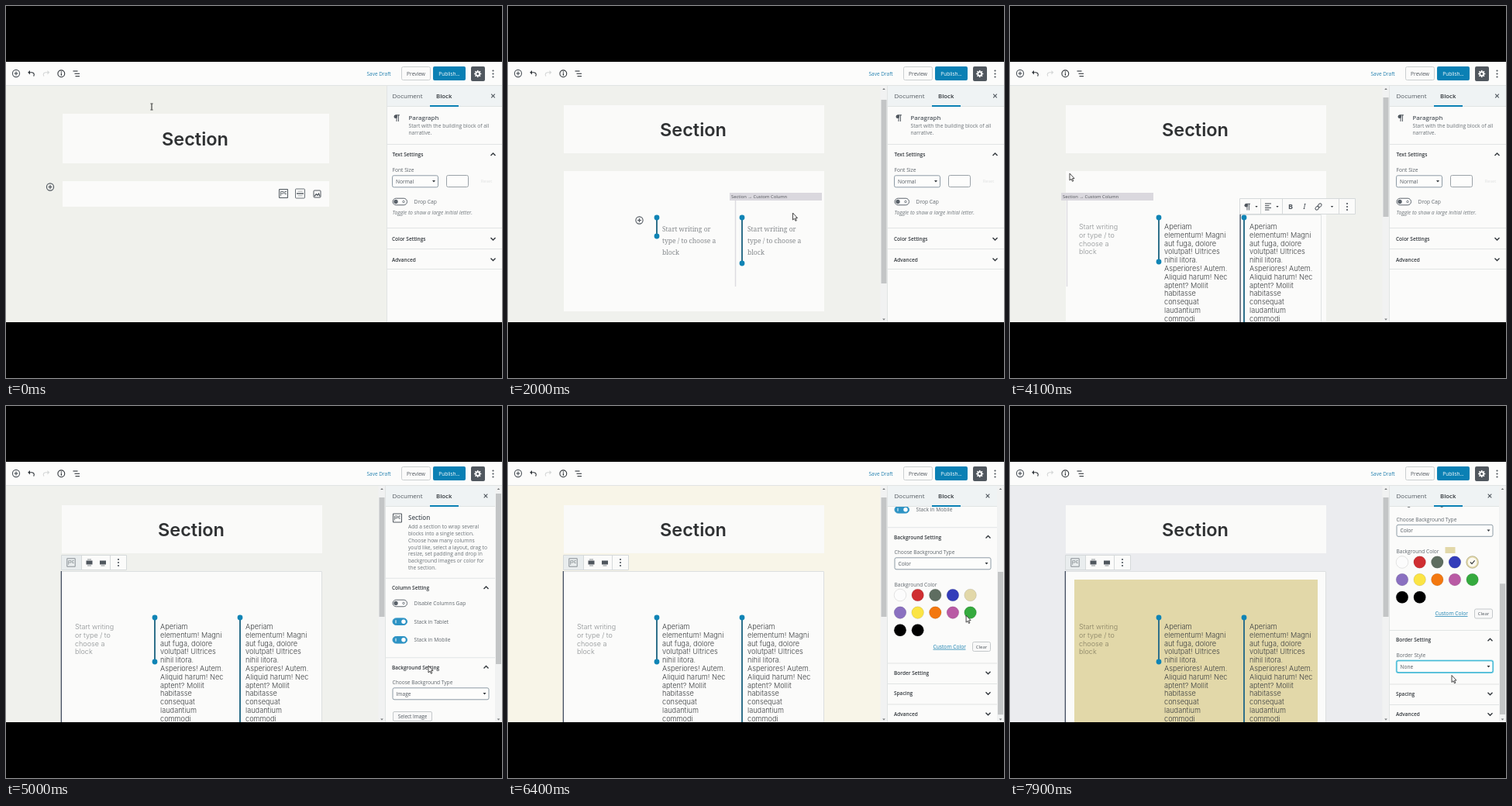
An HTML page with a canvas for the animation above (8 s loop, 640 px wide and 480 px high).

```html
<!DOCTYPE html>
<html lang="en">
<head>
<meta charset="utf-8">
<title>Section block</title>
<style>
html, body { margin: 0; width: 100%; height: 100%; overflow: hidden; background: #000; }
canvas { display: block; }
</style>
</head>
<body>
<canvas id="stage" width="640" height="480"></canvas>
<script>
const c = document.getElementById('stage').getContext('2d');
const LOOP = 8000;
const UI = '"Open Sans", sans-serif';
const BODY = 'Inter, sans-serif';
const SERIF = '"Noto Serif", serif';
const BLUE = '#0a80b4', DARK = '#50575e', INK = '#32373c', LINE = '#e1e4e4', PAPER = '#fbfbfa';
const SAND = '#e2d8a9';

// Moments at which the interface changes state
const AT = {
  picker: 700, columns: 1600, paste2: 2700, paste3: 3500, section: 4300,
  bgOpen: 4900, listOpen: 5500, color: 6000, sand: 6600, border: 7400
};

const COPY = ['Aperiam', 'elementum! Magni', 'aut fuga, dolore', 'volutpat! Ultrices', 'nihil litora.',
  'Asperiores! Autem.', 'Aliquid harum! Nec', 'aptent? Mollit', 'habitasse', 'consequat', 'laudantium', 'commodi'];

const CURSOR = [
  [0, 188, 130, 'beam'], [450, 358, 243, 'arrow'], [750, 358, 243, 'arrow'], [1200, 244, 287, 'beam'],
  [1500, 308, 311, 'hand'], [1650, 308, 311, 'arrow'], [2000, 367.5, 270, 'arrow'], [2400, 238, 302, 'beam'],
  [2750, 238, 302, 'beam'], [3200, 345, 302, 'beam'], [3800, 345, 302, 'beam'], [4100, 77, 219, 'arrow'],
  [4300, 77, 219, 'arrow'], [4800, 545, 338, 'hand'], [5000, 545, 338, 'arrow'], [5400, 568, 340, 'arrow'],
  [5800, 568, 340, 'arrow'], [5950, 560, 348, 'arrow'], [6100, 560, 348, 'arrow'], [6550, 602, 247, 'hand'],
  [6850, 602, 247, 'hand'], [7250, 540, 344, 'hand'], [7450, 540, 344, 'arrow'], [7900, 570, 350.5, 'arrow']
];

const ease = (t, a, b) => {
  const k = Math.min(1, Math.max(0, (t - a) / (b - a)));
  return k * k * (3 - 2 * k);
};

function box(x, y, w, h, fill, stroke, r = 0) {
  c.beginPath();
  c.roundRect(x, y, w, h, r);
  if (fill) { c.fillStyle = fill; c.fill(); }
  if (stroke) { c.strokeStyle = stroke; c.lineWidth = 1; c.stroke(); }
}

// y is the middle of the capitals
function text(str, x, y, size, color = INK, font = UI, style = '', align = 'left') {
  c.font = `${style} ${size}px ${font}`;
  c.textAlign = align;
  c.fillStyle = color;
  c.fillText(str, x, y + size * 0.36);
}

function lines(list, x, y, step, ...rest) {
  list.forEach((s, i) => text(s, x, y + i * step, ...rest));
}

function path(points, color = DARK, width = 1) {
  c.beginPath();
  points.forEach(([x, y]) => c.lineTo(x, y));
  c.strokeStyle = color;
  c.lineWidth = width;
  c.stroke();
}

function disc(x, y, r, fill, stroke, width = 1) {
  c.beginPath();
  c.arc(x, y, r, 0, 7);
  if (fill) { c.fillStyle = fill; c.fill(); }
  if (stroke) { c.strokeStyle = stroke; c.lineWidth = width; c.stroke(); }
}

function clipped(x, y, w, h, draw) {
  c.save();
  c.beginPath();
  c.rect(x, y, w, h);
  c.clip();
  draw();
  c.restore();
}

const kebab = (x, y) => [-4, 0, 4].forEach(d => disc(x, y + d, 1.1, DARK));
const rule = (x, y) => box(x, y, 640 - x, 1, LINE);
const cross = (x, y) => {
  path([[x - 2.3, y - 2.3], [x + 2.3, y + 2.3]], DARK, 1.1);
  path([[x + 2.3, y - 2.3], [x - 2.3, y + 2.3]], DARK, 1.1);
};
const chevron = (x, y, up) => {
  const d = up ? -1.5 : 1.5;
  path([[x - 3, y - d], [x, y + d], [x + 3, y - d]], INK, 1.4);
};
const triangle = (x, y, s = 2, up = false, color = INK) => {
  const d = up ? -s * 0.6 : s * 0.6;
  c.beginPath();
  c.moveTo(x - s, y - d);
  c.lineTo(x + s, y - d);
  c.lineTo(x, y + d);
  c.fillStyle = color;
  c.fill();
};

function plusIcon(x, y, r = 4.6) {
  disc(x, y, r, null, DARK, 1.1);
  path([[x - 2.4, y], [x + 2.4, y]], DARK, 1.2);
  path([[x, y - 2.4], [x, y + 2.4]], DARK, 1.2);
}

function sectionIcon(x, y, s = 1, color = DARK) {
  c.save();
  c.translate(x, y);
  c.scale(s, s);
  box(-5.5, -5.5, 11, 11, null, color);
  path([[-3.5, 3], [-3.5, -2.5], [0, -2.5], [0, 0], [-3.5, 0]], color, 0.8);
  path([[4, -2.5], [1.8, -2.5], [1.8, 0.5], [4, 0.5]], color, 0.8);
  c.restore();
}

function pilcrow(x, y) {
  c.beginPath();
  c.arc(x - 1.2, y - 1.8, 2.3, 0, 7);
  c.fillStyle = DARK;
  c.fill();
  path([[x - 1.5, y - 3.7], [x + 4, y - 3.7]], DARK, 1);
  path([[x, y - 4], [x, y + 4.5]], DARK, 1);
  path([[x + 2.4, y - 4], [x + 2.4, y + 4.5]], DARK, 1);
}

function undo(x, y, flip, color) {
  c.save();
  c.translate(x, y);
  c.scale(flip, 1);
  path([[-3, -1.3], [1.2, -1.3], [3.2, -0.3], [3.8, 1.5], [3.2, 3.6]], color, 1.1);
  c.beginPath();
  c.moveTo(-4.3, -1.3); c.lineTo(-1.5, -4); c.lineTo(-1.5, 1.4);
  c.fillStyle = color;
  c.fill();
  c.restore();
}

function gear(x, y) {
  for (let i = 0; i < 8; i++) {
    const a = i * Math.PI / 4;
    path([[x, y], [x + 4.6 * Math.cos(a), y + 4.6 * Math.sin(a)]], '#fff', 1.6);
  }
  disc(x, y, 3.3, '#fff');
  disc(x, y, 1.5, DARK);
}

function topBar() {
  box(0, 72, 640, 31, '#fcfcfb');
  box(0, 102, 640, 1, LINE);
  plusIcon(13, 87);
  undo(32.5, 87, 1, INK);
  undo(52, 87, -1, '#d6d8d8');
  disc(71.3, 87.3, 4.4, null, INK, 1.1);
  box(70.8, 86.5, 1.2, 3.3, INK);
  box(70.8, 84.6, 1.2, 1.2, INK);
  path([[86.5, 84], [92.5, 84]], INK, 1.1);
  path([[88.5, 87.3], [95, 87.3]], INK, 1.1);
  path([[89.5, 90.6], [95, 90.6]], INK, 1.1);
  text('Save Draft', 465.5, 87.5, 6.5, '#2582b0');
  box(510.5, 78.5, 37, 17, '#fbfbfa', '#cbcfd0', 2);
  text('Preview', 529, 87.5, 6.6, DARK, UI, '', 'center');
  box(551, 78, 42, 18, BLUE, null, 2);
  text('Publish…', 572, 87.5, 6.5, '#fff', UI, '', 'center');
  box(600, 78, 18, 19, DARK, null, 2);
  gear(608.7, 87.5);
  kebab(628.5, 87.5);
}

function toggle(x, y, on) {
  box(x - 9, y - 4.3, 18.5, 8.6, on ? '#2d93c4' : '#fff', on ? '#2d93c4' : '#5a626a', 4.3);
  disc(x + (on ? 5 : -5), y, 2.7, on ? '#fff' : '#5a626a');
  if (on) box(x - 5.5, y - 2, 1, 4, '#fff');
  else disc(x + 5, y, 1.3, null, '#5a626a', 0.8);
}

function select(label, x, y, w, focus) {
  box(x + 0.5, y - 7.5, w - 1, 15, '#fdfdfc', focus ? '#16a3c7' : '#8d9ba5', 2);
  if (focus) box(x - 0.2, y - 8.2, w + 0.4, 16.4, null, 'rgba(30,180,215,.6)', 2);
  text(label, x + 5, y + 0.3, 6.6, DARK);
  triangle(x + w - 6, y, 2);
}

function paragraphPanel(left) {
  pilcrow(504, 144.5);
  text('Paragraph', 519.5, 144, 7.8, DARK, UI, '600');
  lines(['Start with the building block of all', 'narrative.'], 519.5, 155, 8.7, 6.7, '#6c7378');
  rule(left, 178);
  text('Text Settings', 498.5, 191.7, 6.5, INK, UI, '600');
  chevron(628.5, 191.5, true);
  text('Font Size', 498.5, 211.5, 6.7, '#5f666c');
  select('Normal', 498, 226.3, 60);
  box(568.5, 218.5, 28, 15, '#fdfdfc', '#9aa2a8', 2);
  text('Reset', 620, 226, 5.6, '#dfe1e1', UI, '', 'center');
  toggle(508, 252.5, false);
  text('Drop Cap', 526.5, 252.5, 6.7, '#5f666c');
  text('Toggle to show a large initial letter.', 498.5, 266.5, 6.8, '#70777c', UI, 'italic');
  rule(left, 286);
  text('Color Settings', 498, 300.7, 6.5, INK, UI, '600');
  chevron(628.5, 300.5);
  rule(left, 313);
  text('Advanced', 498, 327.2, 6.5, INK, UI, '600');
  chevron(628.5, 327);
  rule(left, 339);
}

function swatches(y, chosen) {
  const rows = [
    ['#fcfcfc', '#cf2e31', '#5e6d60', '#333cba', SAND],
    ['#8a70c0', '#fbe444', '#f37810', '#b95aa4', '#35aa3e'],
    ['#000', '#000']
  ];
  rows.forEach((row, r) => row.forEach((color, i) => {
    const x = 506 + i * 22.65, cy = y + r * 22.6;
    const picked = chosen && color === SAND;
    if (picked) {
      disc(x, cy, 7, '#fbf9f0', SAND, 2.2);
      path([[x - 2.7, cy], [x - 0.6, cy + 2.2], [x + 3, cy - 2.2]], INK, 1.1);
    } else {
      disc(x, cy, 7.8, color);
    }
    disc(x, cy, 7.8, null, picked ? 'rgba(70,70,50,.35)' : 'rgba(0,0,0,.14)', 0.7);
  }));
}

function panelTitle(label, y, open) {
  box(490, y - 13, 141, 1, LINE);
  text(label, 498, y, 6.5, INK, UI, '600');
  chevron(619.5, y - 0.3, open);
}

function panelHeights(t) {
  const bg = t < AT.bgOpen ? 26.5 : t < AT.color ? 97 : 175;
  const border = 337.5 + bg;
  const spacing = border + (t < AT.border ? 26.5 : 69.5);
  return { border, spacing, advanced: spacing + 26.5, bottom: spacing + 40 };
}

function sidebarScroll(t) {
  return 36 * ease(t, 5000, 5300) + 132 * ease(t, 6050, 6400) + 42.5 * ease(t, 7400, 7700);
}

function sectionPanel(t) {
  const p = panelHeights(t), scroll = sidebarScroll(t);
  clipped(490, 130, 141, 278, () => {
    c.translate(0, -scroll);
    sectionIcon(505, 144.5);
    text('Section', 519, 144, 8, DARK, UI, '600');
    lines(['Add a section to wrap several', 'blocks into a single section.', 'Choose how many columns',
      'you’d like, select a layout, drag to', 'resize, set padding and drop in', 'background images or color for',
      'the section.'], 519, 156, 8.7, 6.7, '#6c7378');
    panelTitle('Column Setting', 234.7, true);
    [['Disable Columns Gap', 254.5], ['Stack in Tablet', 278.2], ['Stack in Mobile', 301.8]].forEach(([s, y], i) => {
      toggle(508, y, i > 0);
      text(s, 526.5, y, 6.7, '#5f666c');
    });
    panelTitle('Background Setting', 337.3, t >= AT.bgOpen);
    if (t >= AT.bgOpen) {
      text('Choose Background Type', 498.5, 356.7, 6.6, '#5f666c');
      const open = t >= AT.listOpen && t < AT.color;
      select(t < AT.color ? 'Image' : 'Color', 498.5, 371.3, 125, open);
      if (t < AT.color) {
        box(499.5, 394.5, 50, 12, '#f8f8f8', '#c5c9cb', 1.5);
        text('Select Image', 524.5, 400.5, 6.4, DARK, UI, '', 'center');
      } else {
        text('Background Color', 498.5, 398.3, 6.6, '#5f666c');
        if (t >= AT.sand) box(561.5, 392.5, 13, 8, SAND);
        swatches(412, t >= AT.sand);
        text('Custom Color', 548.5, 478.5, 6.7, '#1981b0');
        box(548.5, 481.8, 42, 0.7, '#1981b0');
        box(599.5, 472.5, 23, 12, '#f8f8f8', '#c5c9cb', 2);
        text('Clear', 611, 478.7, 6, DARK, UI, '', 'center');
      }
      if (open) {
        box(499.5, 379.5, 123, 19.5, '#fff', '#a9b0b6');
        const onColor = t >= 5900;
        box(500, onColor ? 380 : 389, 122.5, 9.5, '#1e90f0');
        text('Color', 503, 384.5, 6.6, onColor ? '#fff' : DARK);
        text('Image', 503, 394, 6.6, onColor ? DARK : '#fff');
      }
    }
    panelTitle('Border Setting', p.border, t >= AT.border);
    if (t >= AT.border) {
      text('Border Style', 498.5, p.border + 19.7, 6.6, '#5f666c');
      select('None', 498.5, p.border + 34.3, 125, true);
    }
    panelTitle('Spacing', p.spacing);
    panelTitle('Advanced', p.advanced);
  });
  const size = p.bottom - 102, k = 287 / size;
  scrollbar(631, 113 + scroll * k, 306 * k);
}

function scrollbar(x, y, h) {
  box(x, 103, 9, 305, '#f1f2f2');
  triangle(x + 4.5, 107, 1.8, true, '#6d7072');
  triangle(x + 4.5, 404.5, 1.8, false, '#6d7072');
  box(x + 1, y, 7, h, '#c3c5c6');
}

function sidebar(t) {
  const left = t < AT.picker ? 492 : 490;
  const onSection = (t >= AT.picker && t < AT.columns) || t >= AT.section;
  box(left, 103, 640 - left, 305, PAPER);
  if (onSection) sectionPanel(t);
  else paragraphPanel(left);
  const right = onSection ? 631 : 640;
  box(left, 103, right - left, 27, '#eff3f4');
  box(left, 129, right - left, 1, LINE);
  box(left - 1, 103, 1, 305, LINE);
  text('Document', 498.5, 116.5, 8, DARK);
  text('Block', 555, 116.5, 7.8, INK, UI, '600');
  box(547, 128, 37, 2, BLUE);
  cross(right - (onSection ? 12 : 11.5), 116);
}

function heading(x, y, w, h) {
  box(x, y, w, h, '#fafaf9');
  text('Section', x + w / 2 - 1, y + h / 2 + 0.3, 23.5, '#2f3133', BODY, '600', 'center');
}

function blockToolbar(y) {
  box(71.5, y + 0.5, 84, 19, PAPER, '#d5d9da');
  box(72, y + 1, 25, 18, '#e9edee');
  sectionIcon(84, y + 10, 0.95, '#858c91');
  path([[97.5, y], [97.5, y + 20]], '#d5d9da');
  path([[134.5, y], [134.5, y + 20]], '#d5d9da');
  [107.5, 125].forEach((x, i) => {
    box(x - 4, y + 7.5, 8, 5, DARK);
    const edges = i ? [14] : [6, 14];
    edges.forEach(d => path([[x - 2.5, y + d], [x + 2.5, y + d]], '#8a9094'));
  });
  kebab(145, y + 10);
}

function emptyEditor() {
  heading(73, 139, 344, 64);
  box(73, 226, 344, 33, PAPER);
  plusIcon(57, 233.5);
  sectionIcon(358, 242);
  box(373.5, 236, 12, 12, null, '#6b7278', 1);
  path([[375, 242], [384, 242]], DARK, 1.4);
  path([[376.5, 239.2], [382.5, 239.2]], '#9aa0a4', 0.8);
  path([[376.5, 244.8], [382.5, 244.8]], '#9aa0a4', 0.8);
  box(397, 238, 9, 9, null, DARK, 1);
  path([[398, 245.5], [400.3, 242.7], [402, 244.3], [403.5, 242], [405, 245.5]], DARK, 1.3);
}

const selectionBar = (x, y, h) => box(x, y, 1.3, h, '#434d60');

function columnPicker() {
  heading(73, 119, 335, 62);
  box(71.5, 205.5, 336, 191, PAPER, '#e0e2e0');
  selectionBar(70.7, 205, 192);
  blockToolbar(184);
  box(83, 215, 314, 171, '#e7e7e6');
  sectionIcon(218.5, 239, 0.85);
  text('Section', 229, 239, 10.1, INK, BODY);
  text('Select the number of columns for this row.', 239.5, 270.5, 7.85, '#3e4347', BODY, '', 'center');
  const splits = [[], [1 / 2], [1 / 3, 2 / 3], [1 / 4, 1 / 2, 3 / 4], [1 / 3], [2 / 3]];
  splits.forEach((cuts, i) => {
    const x = 143 + (i % 3) * 68.4, y = i < 3 ? 295 : 338;
    box(x, y, 57, 31, '#fbfbfa', '#efefed', 3);
    box(x + 15.5, y + 9.5, 26, 13, null, INK);
    cuts.forEach(k => path([[x + 15.5 + 26 * k, y + 9.5], [x + 15.5 + 26 * k, y + 22.5]], INK));
  });
}

function handle(x, end) {
  path([[x, 273], [x, end]], '#2f708a', 2);
  [273, end].forEach(y => disc(x, y, 3.4, '#0f84b5'));
}

function columnLabel(x) {
  box(x, 241, 119, 10, '#dad8de');
  text('Section → Custom Column', x + 2, 246, 5.8, '#4f5157');
  path([[x + 7.5, 251], [x + 7.5, 362]], '#dddce1', 1.5);
}

function textToolbar() {
  box(296.5, 248.5, 149, 20, PAPER, '#d5d9da');
  [323.5, 351.5, 424.5].forEach(x => path([[x, 249], [x, 268]], '#d5d9da'));
  pilcrow(306, 259);
  triangle(318, 259, 1.6);
  [[8, -4], [5.5, -1.3], [8, 1.4], [5.5, 4]].forEach(([w, d]) => path([[329, 259 + d], [329 + w, 259 + d]], DARK, 1.1));
  triangle(345, 259, 1.6);
  text('B', 362, 259, 9, DARK, UI, 'bold', 'center');
  text('I', 380, 259, 9, DARK, SERIF, 'italic', 'center');
  c.save();
  c.translate(398, 259);
  c.rotate(-Math.PI / 4);
  box(-5, -1.8, 5, 3.6, null, DARK, 1.8);
  box(0, -1.8, 5, 3.6, null, DARK, 1.8);
  c.restore();
  triangle(415.5, 259, 1.6);
  kebab(435, 259);
}

function columnsEditor(t) {
  const pasted2 = t >= AT.paste2, pasted3 = t >= AT.paste3, selected = t >= AT.section;
  const bottom = pasted2 ? 430 : 394;
  heading(72, 128, 336, 62);
  box(72, 213, 336, bottom - 213, PAPER);
  if (selected) {
    box(71.5, 213.5, 336, 217, null, '#dcdfe0');
    selectionBar(70.7, 213, 200);
  }
  if (t >= AT.sand) box(83, 224, 314, 200, SAND);

  const hint = ['Start writing or', 'type / to choose a', 'block'];
  const serifHint = x => lines(hint, x, 288, 15, 8.5, '#85898c', SERIF);
  const copy = x => lines(COPY, x, 284.7, 10.8, 9.2, '#3c3f41', BODY, '300');
  if (t >= 2400) {
    lines(['Start writing', 'or type / to', 'choose a', 'block'], 89, 284.7, 10.8, 9, t >= AT.sand ? '#857f62' : '#8c9092', BODY, '300');
  } else {
    plusIcon(169.5, 276.5);
  }
  (pasted2 ? copy : serifHint)(199);
  (pasted3 ? copy : serifHint)(309);

  if (t >= 1900 && t < 2200) columnLabel(286);
  if (t >= 2200 && t < 2900) columnLabel(176);
  if (t >= 2900 && t < 3900) columnLabel(286);
  if (t >= 4000 && t < AT.section) columnLabel(66);

  if (t >= 3200 && !selected) {
    box(296.5, 269.5, 105, 160, null, '#dfe2e2');
    selectionBar(296.5, 249, 160);
    textToolbar();
  }
  handle(192, t < 2400 ? 297 : 330);
  handle(302, pasted2 ? 430 : 332);
  if (selected) blockToolbar(192);
}

function backdrop(t) {
  if (t < 900) return '#f0f1ec';
  if (t < AT.columns) return '#f7f4eb';
  if (t < 6400) return '#f0f1ed';
  return t < 7200 ? '#f8f5e8' : '#ebecef';
}

function editor(t) {
  box(0, 103, 492, 305, backdrop(t));
  if (t < AT.picker) return emptyEditor();
  if (t < AT.columns) {
    columnPicker();
    return scrollbar(480.5, 127, 229);
  }
  columnsEditor(t);
  if (t < AT.paste2) scrollbar(480.5, 121, 237);
  else scrollbar(480.5, 118, 154);
}

function cursor(t) {
  let i = 0;
  while (i < CURSOR.length - 2 && t >= CURSOR[i + 1][0]) i++;
  const [t0, x0, y0, kind0] = CURSOR[i], [t1, x1, y1, kind1] = CURSOR[i + 1];
  const k = ease(t, t0, t1);
  const kind = t >= t1 ? kind1 : kind0;
  c.save();
  c.translate(x0 + (x1 - x0) * k, y0 + (y1 - y0) * k);
  if (kind === 'beam') {
    path([[0, -3.8], [0, 3.8]], '#333', 1.1);
    path([[-1.6, -4], [1.6, -4]], '#333', 0.9);
    path([[-1.6, 4], [1.6, 4]], '#333', 0.9);
  } else {
    const shape = kind === 'hand'
      ? [[-1.5, -5], [0, -5], [0.5, -1], [4, 0], [4, 4], [2.5, 7], [-1.5, 7], [-4, 2.5], [-3, 1.5], [-1.5, 3]]
      : [[0, -3], [0, 6], [2, 4.2], [3.5, 7.3], [4.8, 6.7], [3.4, 3.7], [6, 3.5]];
    c.beginPath();
    shape.forEach(([x, y]) => c.lineTo(x, y));
    c.closePath();
    c.fillStyle = '#fff';
    c.fill();
    c.strokeStyle = '#333';
    c.lineWidth = 0.9;
    c.stroke();
  }
  c.restore();
}

function draw(t) {
  box(0, 0, 640, 480, '#000');
  clipped(0, 72, 640, 336, () => {
    editor(t);
    sidebar(t);
    topBar();
    cursor(t);
  });
}

const start = performance.now();
function tick() {
  const elapsed = (performance.now() - start) % LOOP;
  draw(Math.floor(elapsed / 100) * 100);
  requestAnimationFrame(tick);
}
tick();
</script>
</body>
</html>
```
